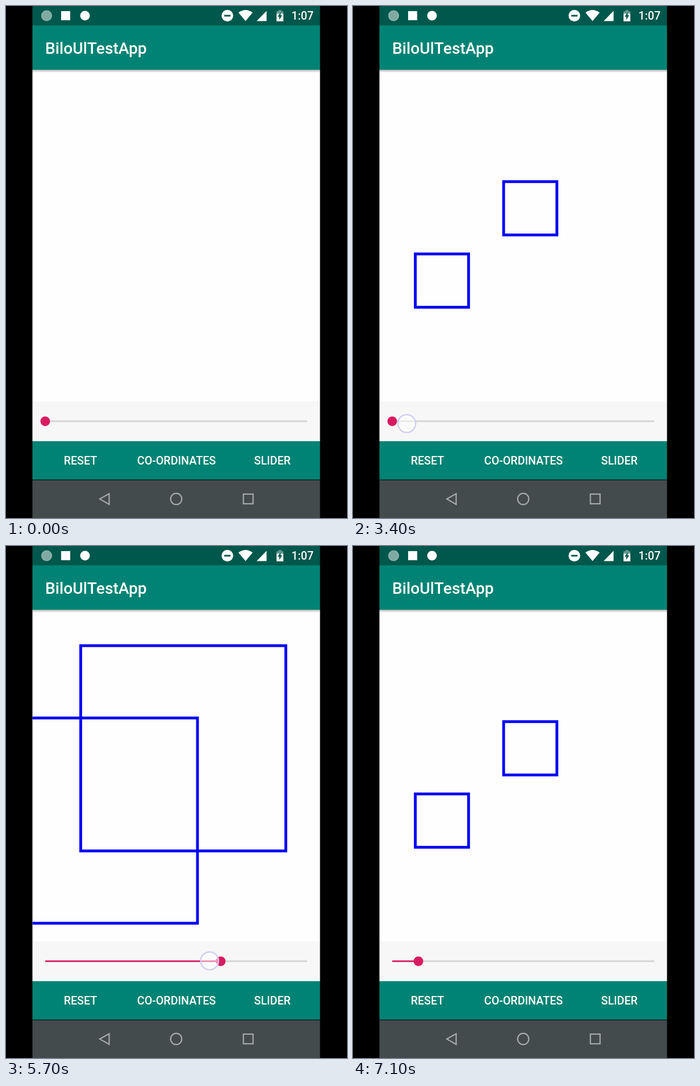
Write an HTML page that moves like this. It is 600 px wide and 900 px high and loops after 7.2 s.

```html
<!DOCTYPE html>
<html lang="en">
<head>
<meta charset="utf-8">
<title>Slider demo</title>
<style>
  html, body { margin: 0; width: 100%; height: 100%; overflow: hidden; background: #000; }
  svg { display: block; width: 600px; height: 900px; }
  text { font-family: Roboto, sans-serif; font-weight: 500; fill: #fff; }
  .button { font-size: 19.7px; text-anchor: middle; }
  .square { fill: none; stroke: #0000f4; stroke-width: 4.9; }
  .nav { fill: none; stroke: #a5aaab; stroke-width: 2.2; }
</style>
</head>
<body>
<svg viewBox="0 0 600 900">
  <defs>
    <clipPath id="canvas"><rect x="46.5" y="112" width="506" height="583"/></clipPath>
    <linearGradient id="shade" x2="0" y2="1">
      <stop stop-color="#000" stop-opacity=".3"/>
      <stop offset="1" stop-color="#000" stop-opacity="0"/>
    </linearGradient>
  </defs>
  <rect width="600" height="900"/>
  <g transform="translate(46.5)">
    <rect width="506" height="34" fill="#00574b"/>
    <rect y="34" width="506" height="78" fill="#008374"/>
    <rect y="112" width="506" height="583" fill="#fdfefd"/>
    <rect y="112" width="506" height="5" fill="url(#shade)"/>
    <rect y="695" width="506" height="70" fill="#f7f7f7"/>
    <rect y="765" width="506" height="67.5" fill="#008374"/>
    <rect y="833.5" width="506" height="66.5" fill="#434b4d"/>
  </g>

  <!-- status bar -->
  <circle cx="71.5" cy="17" r="8.8" fill="#7fa9a2"/>
  <circle cx="71.5" cy="17" r="8.8" fill="none" stroke="#c2d6d2" stroke-width="1.6" stroke-dasharray="1.3 1"/>
  <rect x="97" y="9" width="16" height="16" fill="#fff"/>
  <circle cx="139" cy="17" r="8.5" fill="#fff"/>
  <g fill="#fff">
    <circle cx="389.5" cy="17" r="10.2"/>
    <rect x="384" y="15.6" width="11" height="2.9" fill="#00574b"/>
    <path d="M409 11.5Q421.5 2.5 434 11.5L421.5 26.5Z"/>
    <path d="M458.5 8.5V26.5H441Z"/>
    <path d="M479.5 7H484.5V9.3H488V14H476V9.3H479.5Z" opacity=".4"/>
    <path d="M476 13.5H488V27H476Z"/>
    <path d="M483.2 11V16.2H486L480.8 24.5V18.7H478Z" fill="#00574b"/>
    <text x="502.3" y="24" font-size="19.7">1:07</text>
  </g>
  <text x="69" y="84" font-size="28.2">BiloUlTestApp</text>

  <g id="squares" clip-path="url(#canvas)">
    <rect class="square"/>
    <rect class="square"/>
  </g>

  <!-- slider -->
  <path d="M69 729.8H530" stroke="#d2d2d2" stroke-width="2.8"/>
  <path id="fill" stroke="#d81b60" stroke-width="2.8"/>
  <circle id="thumb" cy="730" r="8.5" fill="#d81b60"/>
  <circle id="finger" r="15.7" fill="#fff" fill-opacity=".5" stroke="#cdcdf0" stroke-width="2.2"/>

  <text class="button" x="131" y="806">RESET</text>
  <text class="button" x="300" y="806">CO-ORDINATES</text>
  <text class="button" x="468.7" y="806">SLIDER</text>
  <path class="nav" d="M181.5 857.3V876L165 866.6Z"/>
  <circle class="nav" cx="299.5" cy="866.5" r="9.8"/>
  <rect class="nav" x="417.7" y="858" width="17" height="17"/>
</svg>
<script>
const LOOP = 7200, STEP = 100, LAG = 100;
const LEFT = 69, TRACK = 461, UNIT = 468.6, MIN = .1;

const easeOut = p => 1 - (1 - p) ** 2;
const easeIn = p => p ** 3;
const mix = (a, b, p) => a + (b - a) * p;

// each tap leaves a square around its point
const taps = [
  { down: 400, x: 311.9, y: 355.6 },
  { down: 1800, x: 156.5, y: 482.7 }
];

// each drag moves the slider on from where the last one left it
const drags = [
  { down: 3400, up: 3800, time: 300, to: .1, ease: easeOut, y: [734, 734] },
  { down: 4400, up: 5100, time: 250, to: .32, ease: easeOut, y: [730, 726] },
  { down: 5200, up: 5700, time: 300, to: .67, ease: easeOut, y: [726, 731] },
  { down: 5700, up: 6400, time: 200, to: .33, ease: easeIn, y: [731, 717] },
  { down: 6500, up: 7100, time: 400, to: MIN, ease: easeOut, y: [726, 731] }
];

const $ = id => document.getElementById(id);
const set = (el, attrs) => {
  for (const key in attrs) el.setAttribute(key, attrs[key]);
};
const show = (el, on) => set(el, { visibility: on ? "visible" : "hidden" });

const progress = (drag, t) =>
  drag.ease(Math.min(1, Math.max(0, (t - drag.down) / drag.time)));
const valueAt = t => drags.reduce((v, d) => mix(v, d.to, progress(d, t)), 0);
const xOf = value => LEFT + value * TRACK;

function fingerAt(t) {
  const tap = taps.find(p => t >= p.down && t < p.down + 200);
  if (tap) return tap;
  const drag = drags.find(d => t >= d.down && t < d.up);
  // the thumb trails the finger
  return drag && { x: xOf(valueAt(t + LAG)), y: mix(...drag.y, progress(drag, t + LAG)) };
}

function draw(now) {
  const t = Math.floor(now % LOOP / STEP) * STEP;
  const value = Math.round(valueAt(t) * 100) / 100;
  const size = (Math.max(MIN, value) + .1) * UNIT;
  taps.forEach(({ down, x, y }, i) => {
    const square = $("squares").children[i];
    set(square, { x: x - size / 2, y: y - size / 2, width: size, height: size });
    show(square, t >= down + LAG);
  });

  set($("thumb"), { cx: xOf(value) });
  set($("fill"), { d: `M${LEFT} 729.8H${xOf(value)}` });

  const finger = fingerAt(t);
  show($("finger"), finger);
  if (finger) set($("finger"), { cx: finger.x, cy: finger.y });
}

const start = performance.now();
function tick() {
  draw(performance.now() - start);
  requestAnimationFrame(tick);
}
tick();
</script>
</body>
</html>
```
